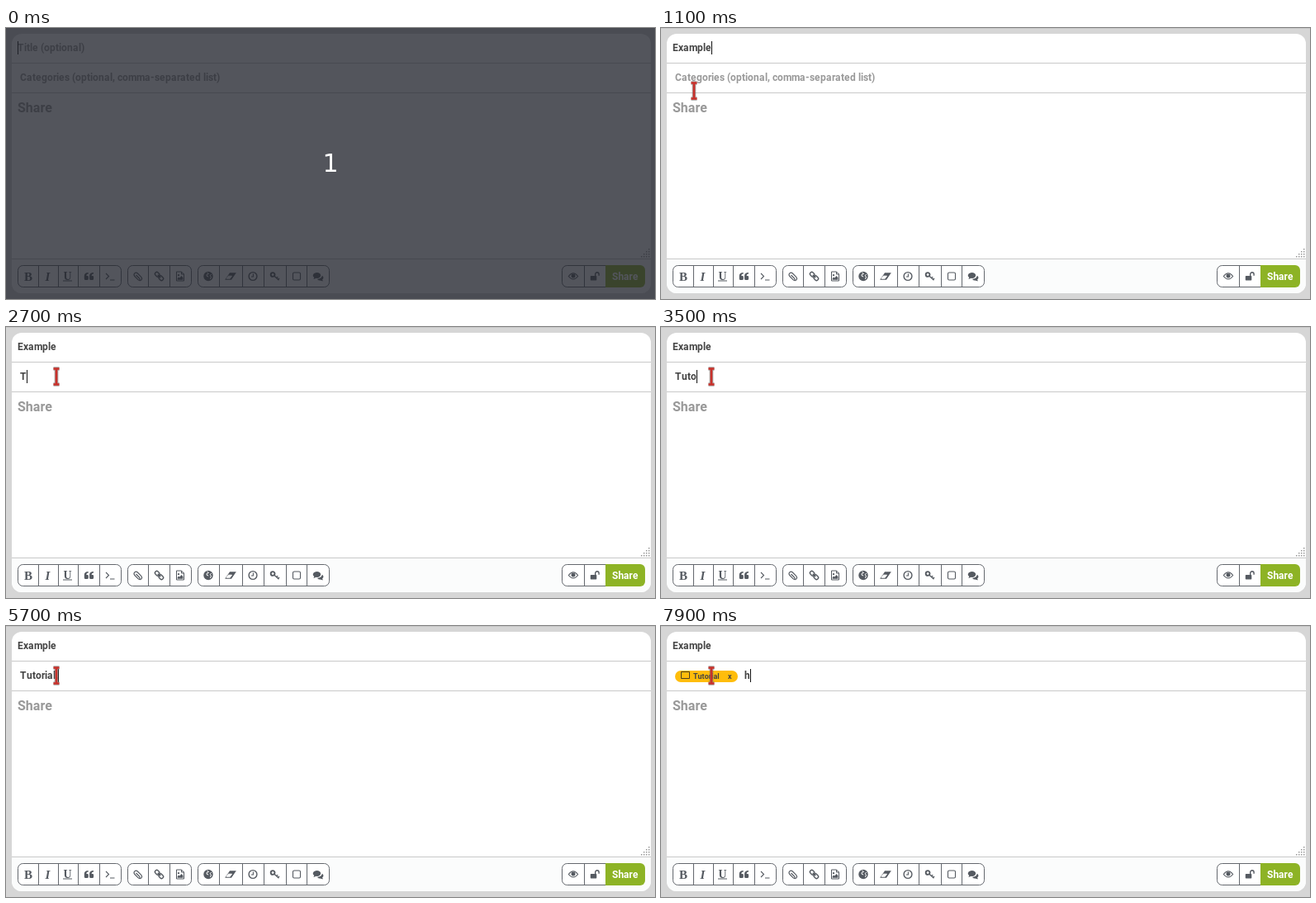
Recreate the animation shown at these times as an HTML page. Size 786 by 328 pixels, loop 8 s.

```html
<!DOCTYPE html>
<html lang="en">
<head>
<meta charset="utf-8">
<title>Share form</title>
<style>
  html, body { margin: 0; width: 100%; height: 100%; overflow: hidden; background: #d6d6d6; }
  svg { display: block; }
  text { font-family: Roboto, sans-serif; font-weight: 700; font-size: 12px; fill: #444; font-kerning: none; }
  .hint { fill: #999; }
  .rule { stroke: #c9c9c9; }
  .box { fill: #fff; stroke: #64686e; }
  .icon { fill: none; stroke: #555a61; stroke-width: 1.4; }
  .icon .solid { fill: #555a61; stroke: none; }
  .icon .cut { stroke: #fff; stroke-width: 1; }
  .icon text { font-family: "Liberation Serif", serif; font-size: 15px; fill: #555a61; stroke: none; text-anchor: middle; }
</style>
</head>
<body>
<svg width="786" height="328" viewBox="0 0 786 328">
  <rect width="786" height="328" fill="#d6d6d6"/>
  <rect width="786" height="1" fill="#c6c6c6"/>
  <rect x="7" y="7" width="774" height="314" rx="12" fill="#fff"/>
  <path d="M7 279.5H781V309a12 12 0 0 1-12 12H19a12 12 0 0 1-12-12z" fill="#fbfcfc"/>
  <path class="rule" d="M7 42.5H781M7 78.5H781M7 279.5H781"/>
  <g id="grip" fill="#999"></g>

  <text id="title"></text>
  <text id="cats"></text>
  <text class="hint" x="14" y="102" style="font-size:16px">Share</text>

  <g id="tag">
    <rect x="17" y="54" width="76" height="14" rx="7" fill="#ffbd0b"/>
    <path d="M24.500 55.500h10v8h-10z" fill="none" stroke="#4a4022"/>
    <text x="39" y="64" style="font-size:9px">Tutorial</text>
    <text x="81" y="64" style="font-size:9px">x</text>
  </g>

  <path class="box" d="M733 287.500H679.500a6 6 0 0 0-6 6v14a6 6 0 0 0 6 6H733"/>
  <path class="box" d="M700.500 287.500v26"/>
  <path d="M726 287h42a6 6 0 0 1 6 6v15a6 6 0 0 1-6 6h-42z" fill="#8db325"/>
  <text x="734" y="305" style="fill:#fff">Share</text>
  <g id="groups"></g>

  <g class="icon" transform="translate(27 300.500)"><text y="5">B</text></g>
  <g class="icon" transform="translate(50.500 300.500)"><text y="5" font-style="italic">I</text></g>
  <g class="icon" transform="translate(74.500 300.500)"><text y="4" style="font-size:14px">U</text><path d="M-5.500 5.500h11" stroke-width="1"/></g>
  <g class="icon" transform="translate(100.500 300.500)">
    <path class="solid" id="quote" d="M-.8-4.500v1.400c-1.700 0-2.300 1-2.300 2.600h1.200q1.200 0 1.200 1.200v2.200q0 1.500-1.500 1.500h-2q-1.500 0-1.500-1.500V-.5c0-2.700 1.900-4 4.900-4z"/>
    <use href="#quote" x="6.300"/>
  </g>
  <g class="icon" transform="translate(126 300.500)" stroke-width="1"><path d="M-5-3.500l3.500 3.500-3.500 3.500M0 4.500h5.500" style="stroke-width:1.100"/></g>

  <g class="icon" transform="translate(160 300.500)"><path d="M-2.500-1.500l4 4c1.600 1.500-.3 3-1.600 1.700l-4-4.200c-2.400-2.600 1-6 3.500-3.500l4.300 4.400c2.400 2.600-.9 5.700-3.200 3.400" style="stroke-width:1.100"/></g>
  <g class="icon" transform="translate(185.500 300.500) rotate(45)">
    <rect x="-6.200" y="-2.200" width="6" height="4.400" rx="2"/><rect x=".2" y="-2.200" width="6" height="4.400" rx="2"/><path d="M-2.500 0h5"/>
  </g>
  <g class="icon" transform="translate(211 300.500)">
    <path d="M-4.500-5.500h6l3 3v8h-9zM1.500-5.500v3h3" style="stroke-width:1"/>
    <path class="solid" d="M-3.300 4.300v-1.800l1.500-1.500 1 1 2.300-2.500 1.900 2v2.800z"/><circle class="solid" cx="-2" cy="-1.300" r="1.100"/>
  </g>

  <g class="icon" transform="translate(245 300.500)">
    <circle class="solid" r="5.700"/>
    <path d="M-1.500-4.500l2 1.500-2.500 1 .2 1.800 2 .7M3.800-2.500l-1.800 1.800 1.500 1.200-1 3" class="cut"/>
  </g>
  <g class="icon" transform="translate(272 300.500)">
    <path class="solid" d="M-1-4.200H6.800L1 4.200H-6.800z"/><path class="cut" d="M-4.900 2.700l2.200-3H1.500l-2.200 3z" fill="#fff"/>
  </g>
  <g class="icon" transform="translate(299 300.500)"><circle r="4.900"/><path d="M.4-3v3.500h-2.400" style="stroke-width:1.100"/></g>
  <g class="icon" transform="translate(325.500 300.500)">
    <circle cx="-2.400" cy="-2" r="2.400" style="stroke-width:1.900"/><path d="M-.5-.2l5.500 5M2.200 2.300l1.500-1.500M4 4l1.500-1.500"/>
  </g>
  <g class="icon" transform="translate(352 300.500)"><rect x="-4.500" y="-4.500" width="9" height="9" rx="1.500" style="stroke-width:1.100"/></g>
  <g class="icon" transform="translate(378 300.500)">
    <path class="solid" d="M2 5c2 .3 2.200.7 4 .8l-1-1.700c2.200-1.400 1.600-3.800-.2-4.800C4.500 1.700 2 3.200-1 3.400 0 4.500 1 4.900 2 5z"/>
    <path class="solid" d="M-1.500-4.500c2.600 0 4.700 1.500 4.700 3.500S1.100 2.400-1.500 2.400l-1.200-.1c-1 .8-1.900 1-2.900 1l.9-1.800C-8-.7-5.500-4.500-1.500-4.500z"/>
  </g>

  <g class="icon" transform="translate(687 300.500)">
    <path d="M-5.700 0Q0-7.500 5.700 0Q0 7-5.700 0z" style="stroke-width:1.100"/><circle class="solid" cy="-.5" r="2.500"/>
  </g>
  <g class="icon" transform="translate(713 300.500)">
    <rect class="solid" x="-5.200" y="-.5" width="7.500" height="5.500" rx=".7"/><path d="M.7-.5v-2a2.200 2.200 0 0 1 4.400 0v1.800"/>
  </g>

  <rect id="caret" width="1" height="16" fill="#111"/>
  <g id="mouse" fill="none">
    <path d="M-3.500-9.500h7M0-9.500v19M-3.500 9.500h7" stroke="#77706e" stroke-opacity=".65" stroke-width="4.600"/>
    <path d="M-3.500-9.500h7M0-9.500v19M-3.500 9.500h7" stroke="#c9302a" stroke-width="2.600"/>
  </g>

  <g id="count">
    <rect width="786" height="328" fill="#23262f" fill-opacity=".78"/>
    <text x="393" y="174" text-anchor="middle" style="font:400 30px 'DejaVu Sans',sans-serif;fill:#fff">1</text>
  </g>
</svg>
<script>
  const LOOP = 8000;
  const $ = id => document.getElementById(id);
  const pen = document.createElement('canvas').getContext('2d');
  pen.font = '700 12px Roboto, sans-serif';

  // Static repeats: toolbar outlines and the resize grip
  const groups = [
    [14.5, 139.5, 39.5, 63.5, 87.5, 113.5],
    [147.5, 224.5, 172.5, 198.5],
    [232.5, 391.5, 258.5, 286.5, 312.5, 339.5, 364.5]
  ];
  $('groups').innerHTML = groups.map(([a, b, ...cuts]) =>
    `<rect class="box" x="${a}" y="287.5" width="${b - a}" height="26" rx="6"/>` +
    cuts.map(x => `<path class="box" d="M${x} 287.5v26"/>`).join('')).join('');
  let dots = '';
  for (let i = 0; i < 4; i++)
    for (let j = 0; j <= i; j++)
      dots += `<rect x="${778 - 3 * j}" y="${267 + 3 * i}" width="1.5" height="1.5"/>`;
  $('grip').innerHTML = dots;

  // Glyphs sit on whole pixels, as in hinted text
  const advance = ch => Math.round(pen.measureText(ch).width + 0.08);
  const textEnd = (str, x) => [...str].reduce((sum, ch) => sum + advance(ch), x);

  function put(el, str, x, y, hint) {
    const key = str + x;
    if (el.dataset.key === key) return;
    el.dataset.key = key;
    el.textContent = str;
    el.setAttribute('x', [...str].map((_, i) => textEnd(str.slice(0, i), x)).join(' '));
    el.setAttribute('y', y);
    el.setAttribute('class', hint ? 'hint' : '');
  }

  const typing = [
    [0, ''], [2700, 'T'], [2900, 'Tu'], [3200, 'Tut'], [3500, 'Tuto'], [4200, 'Tutor'],
    [4300, 'Tutori'], [4600, 'Tutoria'], [4900, 'Tutorial,'], [5100, 'Tutorial'],
    [5700, 'Tutorial,'], [5800, ''], [7900, 'h']
  ];
  const blinks = [[2600, 2700], [3900, 4200], [6300, 7900]];
  const path = [[19, 110], [27, 96], [40, 76], [52, 61], [59, 55], [61, 60]];
  const show = (id, on) => $(id).setAttribute('visibility', on ? 'visible' : 'hidden');

  function draw(t) {
    const named = t >= 600, inCats = t >= 2000, tagged = t >= 5800;
    const title = named ? 'Example' : '';
    const typed = typing.filter(s => s[0] <= t).pop()[1];
    const left = tagged ? 101 : 17;
    const empty = !typed && !tagged;

    put($('title'), title || 'Title (optional)', 14, 28, !title);
    put($('cats'), empty ? 'Categories (optional, comma-separated list)' : typed, left, 64, empty);
    show('tag', tagged);
    show('count', t < 500);

    $('caret').setAttribute('x', inCats ? textEnd(typed, left) : textEnd(title, 14));
    $('caret').setAttribute('y', inCats ? 52 : 16);
    show('caret', !blinks.some(([a, b]) => t >= a && t < b));

    const step = Math.min(Math.floor((t - 900) / 100), path.length - 1);
    show('mouse', step >= 0);
    if (step >= 0) $('mouse').setAttribute('transform', `translate(${path[step]})`);
  }

  const start = performance.now();
  function tick() {
    draw((performance.now() - start) % LOOP);
    requestAnimationFrame(tick);
  }
  tick();
</script>
</body>
</html>
```
